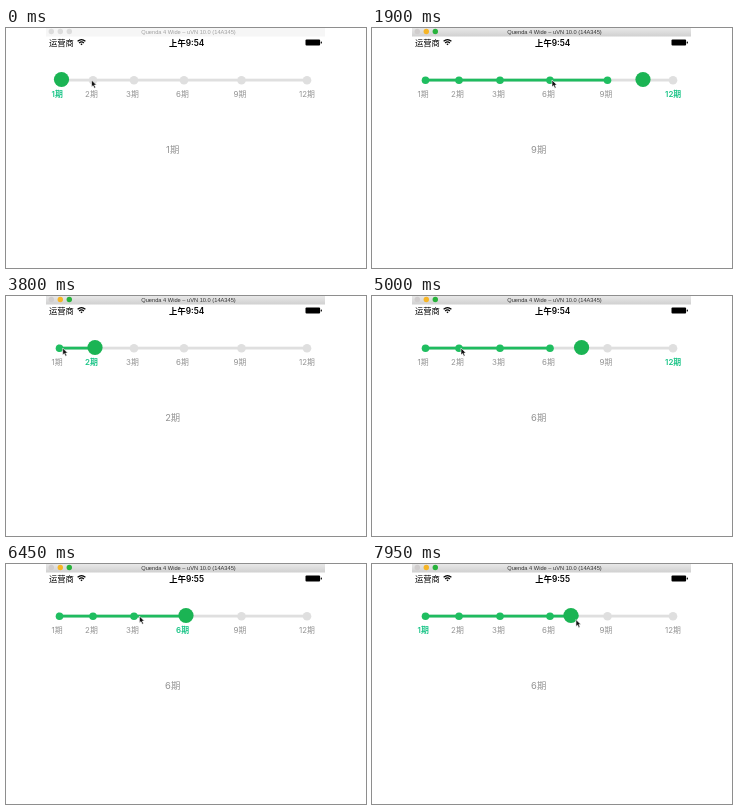
Write an HTML page that moves like this. It is 360 px wide and 240 px high and loops after 8 s.

```html
<!DOCTYPE html>
<html lang="zh">
<head>
<meta charset="utf-8">
<title>分期滑块</title>
<style>
html, body { margin: 0; width: 100%; height: 100%; overflow: hidden; background: #fff; }
svg { display: block; width: 360px; height: 240px; }
text { font-family: Inter, "Noto Sans CJK SC", "Noto Sans CJK", sans-serif; }
.status { font-size: 8.3px; font-weight: 500; }
#clock { font-weight: 600; text-anchor: middle; }
.label { font-size: 7.9px; fill: #949494; }
.label.on { fill: #1cc588; font-weight: 600; }
#value { font-size: 9.4px; text-anchor: middle; }
.dot { fill: #dfdfdf; r: 4.3px; }
.dot.on { fill: #1fbe60; r: 3.8px; }
#bar { fill: url(#metal); }
#caption { font-family: "Liberation Sans", sans-serif; font-size: 5.7px; fill: #333; text-anchor: middle; }
.idle #bar { fill: #f6f6f6; }
.idle #caption { fill: #a0a0a0; }
.idle .light { fill: #dcdcdc; }
</style>
</head>
<body>
<svg id="stage" viewBox="0 0 360 240">
  <defs>
    <linearGradient id="metal" x2="0" y2="1">
      <stop stop-color="#e8e8e8"/><stop offset="1" stop-color="#d0d0d0"/>
    </linearGradient>
  </defs>
  <rect id="bar" x="40" width="279" height="8.5"/>
  <circle class="light" cx="45.3" cy="3.5" r="2.7" fill="#d0cdcd"/>
  <circle class="light" cx="54.3" cy="3.5" r="2.7" fill="#f6b526"/>
  <circle class="light" cx="63.3" cy="3.5" r="2.7" fill="#28b23c"/>
  <text id="caption" x="182.5" y="5.6">Quenda 4 Wide – uVN 10.0 (14A345)</text>

  <text class="status" x="43" y="17.6">运营商</text>
  <g fill="none" stroke="#000" stroke-width="1.2">
    <path d="M71.6 13.3Q75.5 9.9 79.4 13.3M73.1 15Q75.5 12.9 77.9 15"/>
    <path d="M74.3 15.9L75.5 17.2L76.7 15.9Q75.5 15 74.3 15.9Z" fill="#000" stroke="none"/>
  </g>
  <text class="status" id="clock" x="180.7" y="17.6"></text>
  <rect x="299.5" y="11.6" width="14.6" height="5.8" rx="1"/>
  <rect x="314.7" y="13.4" width="1.2" height="2.2" rx=".5"/>

  <rect x="53" y="50.7" width="248" height="2.8" fill="#dfdfdf"/>
  <rect id="fill" x="53.5" y="50.7" height="2.8" fill="#1fbb5f"/>
  <g id="dots"></g>
  <circle id="knob" cy="51.5" r="7.6" fill="#1bb454"/>
  <g id="labels"></g>
  <text class="label" id="value" x="166.7" y="124.8"></text>
  <path id="cursor" d="M0 0V7L1.6 5.6L2.8 8.2L4.1 7.6L2.9 5.1H5Z" fill="#111" stroke="#fff" stroke-width=".6"/>
</svg>
<script>
const LOOP = 8000, STEP = 50;
const FILL_LEAD = 50;                     // the green line runs ahead of the knob
const TAP_SPEED = 0.64, DRAG_SPEED = 0.19; // px per ms
const stops = { 1: 53.5, 2: 87, 3: 128, 6: 178, 9: 235.5, 12: 301 };
const terms = Object.keys(stops);

const tap = (start, to) => ({ start, to, speed: TAP_SPEED });
const drag = (start, to) => ({ start, to, speed: DRAG_SPEED, held: true });
const trips = [
  tap(100, 2), drag(508, 9), tap(1500, 12), tap(1850, 6), tap(2550, 9),
  tap(2850, 3), tap(3350, 2), tap(3850, 1), tap(4250, 12), tap(4854, 2),
  tap(5500, 3), tap(5950, 6), tap(6530, 3), tap(6900, 1), drag(7195, 9)
];
trips.forEach((trip, i) => {
  const before = trips[i - 1] || { to: 1, end: -400 };
  trip.from = before.to;
  trip.ready = before.end;
  trip.end = trip.start + Math.abs(stops[trip.to] - stops[trip.from]) / trip.speed;
});

const el = id => document.getElementById(id);
const add = (parent, tag, attrs) => {
  const node = document.createElementNS(el("stage").namespaceURI, tag);
  for (const key in attrs) node.setAttribute(key, attrs[key]);
  return el(parent).appendChild(node);
};
const dots = terms.map(term => add("dots", "circle", { class: "dot", cx: stops[term], cy: 52.2 }));
const labels = terms.map(term => {
  const node = add("labels", "text", { class: "label", x: stops[term] - 7.9, y: 69.4 });
  node.textContent = term + "期";
  return node;
});

const progress = (t, a, b) => Math.min(1, Math.max(0, (t - a) / (b - a)));
const smooth = p => p * p * (3 - 2 * p);
const mix = (a, b, p) => a + (b - a) * p;
const tripAt = t => trips.find(trip => t < trip.end);

function position(t) {
  const { from, to, start, end } = tripAt(t);
  return mix(stops[from], stops[to], progress(t, start, end));
}

// Between trips the pointer glides to where it presses next.
function pointer(t) {
  const { from, to, held, ready, start } = tripAt(t);
  if (held) return [position(t) + 7, 55.5];
  return [mix(stops[from], stops[to], smooth(progress(t, ready, start))) + 2, 52];
}

function nearest(x) {
  const gap = term => Math.abs(stops[term] - x);
  return terms.reduce((best, term) => gap(term) < gap(best) ? term : best);
}

function draw(t) {
  const value = position(t + FILL_LEAD);
  const reached = nearest(value);
  const settled = tripAt(t).from;

  el("stage").classList.toggle("idle", t < 100);
  el("clock").textContent = t < 5700 ? "上午9:54" : "上午9:55";
  el("fill").setAttribute("width", value - stops[1]);
  el("knob").setAttribute("cx", position(t) + 2);
  el("value").textContent = reached + "期";
  el("cursor").setAttribute("transform", `translate(${pointer(t)})`);
  terms.forEach((term, i) => {
    dots[i].classList.toggle("on", +term <= +reached);
    labels[i].classList.toggle("on", +term === settled);
  });
}

const start = performance.now();
function tick(now) {
  const t = Math.max(0, now - start) % LOOP;
  draw(Math.floor(t / STEP) * STEP);
  requestAnimationFrame(tick);
}
draw(0);
requestAnimationFrame(tick);
</script>
</body>
</html>
```
